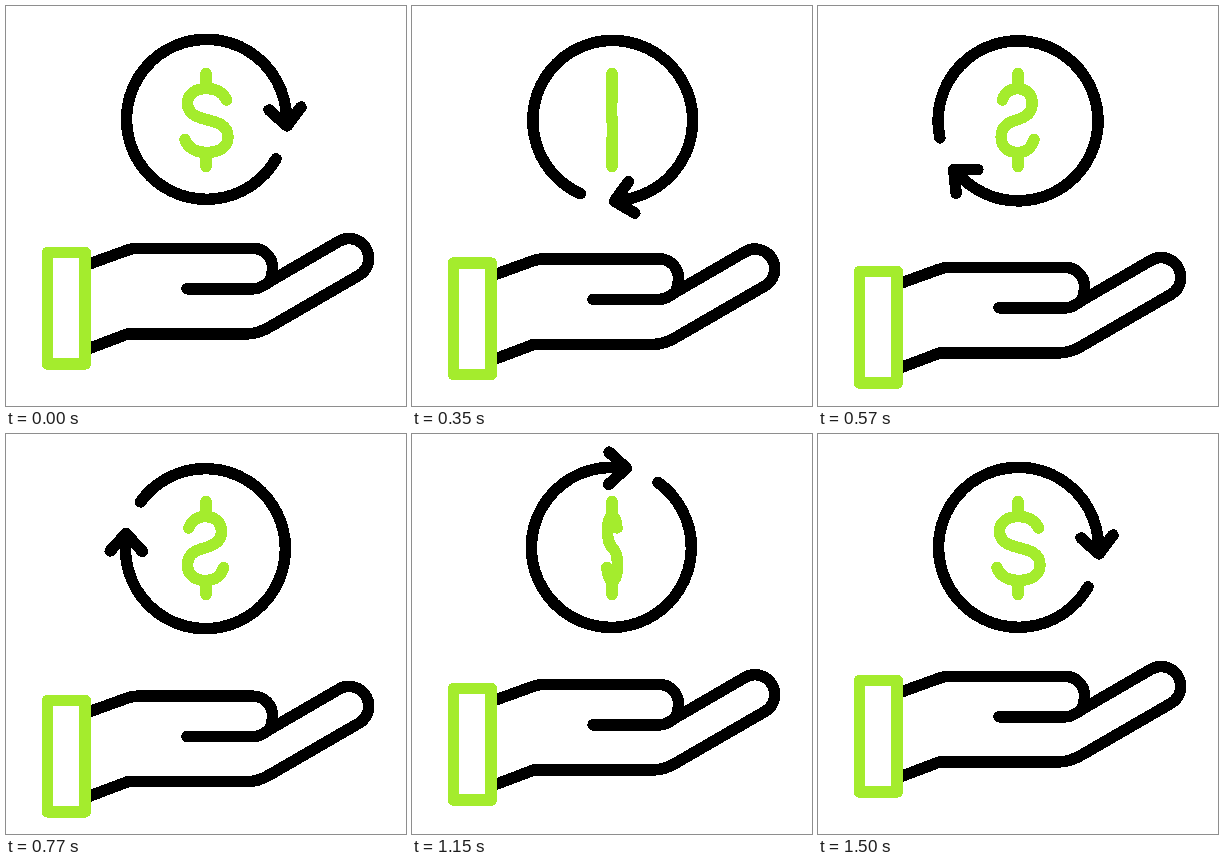
Animation of 400x400 px, one loop 1.52 s. Source, as an HTML page:

```html
<!DOCTYPE html>
<html lang="en">
<head>
<meta charset="utf-8">
<title>Cashback</title>
<style>
  html, body { margin: 0; height: 100%; overflow: hidden; background: #fff; }
  svg { display: block; width: 400px; height: 400px; shape-rendering: crispEdges; }
  path, rect {
    fill: none; stroke: #000; stroke-width: 11.5;
    stroke-linecap: round; stroke-linejoin: round;
    vector-effect: non-scaling-stroke;
  }
  .green { stroke: #a4ec2d; }
</style>
</head>
<body>
<svg viewBox="0 0 400 400">
  <g id="arrow">
    <path d="M70 39A80 80 0 1 1 80.3 5.5M63-10L81 6L95-13"/>
  </g>
  <g id="dollar">
    <path class="green" d="M0-46.5V-32M0 33V46.5
      M20.5-20C17-28 9-31.5 1-31.5C-10-31.5-18.5-26-18.5-17C-18.5-6-9-3 0-.5
      C11 2 22 5 22 17C22 27 13 32.5 0 32.5C-10 32.5-18 28-21 19.5"/>
  </g>
  <g id="hand">
    <path d="M79 259.5L121 244.3Q127 242.3 131 242.3H247C258 242.3 266.5 251 266.5 262Q266.5 269 264 274.5
      M181 282.8H248Q254 282.8 264 275.3L333 235.3A19.7 19.7 0 0 1 353 269.3L264 320.8Q252 327.8 242 327.8H122L79 344"/>
    <rect class="green" x="41.5" y="246.5" width="37.7" height="111.5"/>
  </g>
</svg>
<script>
  const LOOP = 1520, STEPS = 60, PEAK = 27.5;
  const [arrow, dollar, hand] = ['arrow', 'dollar', 'hand'].map(id => document.getElementById(id));
  const ease = x => x * x * (3 - 2 * x);

  function draw(now) {
    // 40 steps per second, on a 10 ms clock
    const clock = Math.floor((now % LOOP) / 10) * 10;
    const step = Math.min(STEPS, Math.floor((clock + 5) / 25));
    const swing = ease(step < PEAK ? step / PEAK : (STEPS - step) / (STEPS - PEAK));

    arrow.setAttribute('transform', `translate(200 114) rotate(${step * 360 / STEPS})`);
    dollar.setAttribute('transform', `translate(200 114) scale(${1 - 1.9 * swing} 1)`);
    hand.setAttribute('transform', `translate(0 ${20.5 * swing})`);
    requestAnimationFrame(draw);
  }
  draw(performance.now());
</script>
</body>
</html>
```
